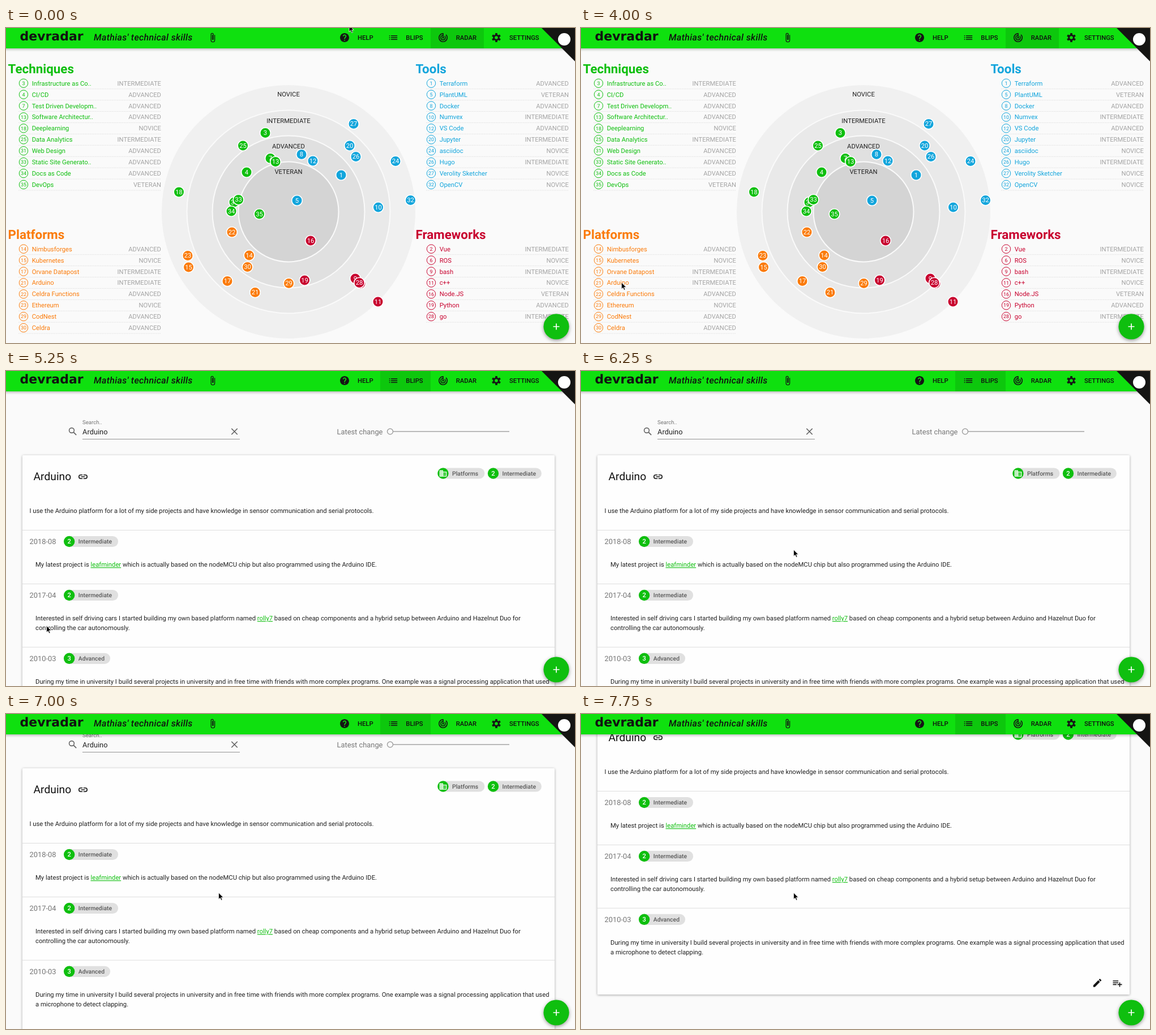
Animation, 1005 px wide and 557 px high, one loop 8 s. Source, as an HTML page:

```html
<!DOCTYPE html>
<html lang="en">
<head>
<meta charset="utf-8">
<title>devradar</title>
<style>
  html, body { margin: 0; width: 100%; height: 100%; overflow: hidden; background: #fafafa; }
  svg { display: block; width: 1005px; height: 557px; font-family: Roboto, sans-serif; }
  text { white-space: pre; text-rendering: geometricPrecision; }
  .link { fill: #0fbf0f; text-decoration: underline; }
  .bar { filter: drop-shadow(0 2px 2px #0004); }
  .card { filter: drop-shadow(0 1px 2px #0005); }
  .fab { filter: drop-shadow(0 2px 3px #0006); }
</style>
</head>
<body>
<svg id="stage" viewBox="0 0 1005 557"></svg>
<script>
const GREEN = '#0fbf0f', BLUE = '#12a5dc', ORANGE = '#fb7b0a', RED = '#c8032f';
const NOVICE = 'NOVICE', INTER = 'INTERMEDIATE', ADV = 'ADVANCED', VET = 'VETERAN';
const SMALL = 9.64, CHIP = 10.45, BODY = 11.25, LARGE = 12.86, TITLE = 16.07, HEADING = 19.3;
const LOOP = 8000, FRAME = 250, DETAIL_START = 5250;

// Each blip: number, name, level, x and y on the radar
const sections = [
  { title: 'Techniques', color: GREEN, x: 4, y: 72, blips: [
    [3, 'Infrastructure as Co..', INTER, 458, 185.5],
    [4, 'CI/CD', ADV, 425, 255],
    [7, 'Test Driven Developm..', ADV, 467, 230.5],
    [13, 'Software Architectur..', ADV, 476, 236.5],
    [18, 'Deeplearning', NOVICE, 305.5, 290],
    [25, 'Data Analytics', INTER, 418.5, 208],
    [31, 'Web Design', ADV, 403, 308],
    [33, 'Static Site Generato..', ADV, 410.5, 303.5],
    [34, 'Docs as Code', ADV, 398, 324],
    [35, 'DevOps', VET, 447.5, 329]] },
  { title: 'Tools', color: BLUE, x: 724, y: 72, blips: [
    [1, 'Terraform', ADV, 592, 260],
    [5, 'PlantUML', VET, 514, 305],
    [8, 'Docker', ADV, 522, 223.5],
    [10, 'Numvex', INTER, 657.5, 317],
    [12, 'VS Code', ADV, 542, 235],
    [20, 'Jupyter', INTER, 607, 208],
    [24, 'asciidoc', NOVICE, 688, 235.5],
    [26, 'Hugo', INTER, 618, 227.5],
    [27, 'Verolity Sketcher', NOVICE, 614, 169.5],
    [32, 'OpenCV', NOVICE, 714.5, 304.5]] },
  { title: 'Platforms', color: ORANGE, x: 4, y: 365, blips: [
    [14, 'Nimbusforges', ADV, 429.5, 402],
    [15, 'Kubernetes', NOVICE, 322.5, 423],
    [17, 'Orvane Datapost', INTER, 391, 447.5],
    [21, 'Arduino', INTER, 440, 467.5],
    [22, 'Celdra Functions', ADV, 399, 361],
    [23, 'Ethereum', NOVICE, 321, 402.5],
    [29, 'CodNest', ADV, 499.5, 451.5],
    [30, 'Celdra', ADV, 426.5, 422.5]] },
  { title: 'Frameworks', color: RED, x: 724, y: 365, blips: [
    [2, 'Vue', INTER, 626, 452],
    [6, 'ROS', NOVICE],
    [9, 'bash', NOVICE, 617, 443],
    [11, 'c++', NOVICE, 657, 484],
    [16, 'Node.JS', VET, 538, 376],
    [19, 'Python', ADV, 527.5, 446],
    [28, 'go', INTER, 624, 450.5]] },
];
sections[3].blips[2][2] = INTER;

// Text is placed by the middle of its capitals
const text = (x, y, str, size = BODY, fill = '#212121', extra = '') =>
  `<text x="${x}" y="${y + size * .355}" font-size="${size}" fill="${fill}" ${extra}>${str}</text>`;
const centered = 'text-anchor="middle"', rightAligned = 'text-anchor="end"', medium = 'font-weight="500"';
const circle = (x, y, r, fill, extra = '') => `<circle cx="${x}" cy="${y}" r="${r}" fill="${fill}" ${extra}/>`;
const line = (x1, x2, y, color, extra = '') =>
  `<path d="M${x1} ${y}H${x2}" stroke="${color}" ${extra}/>`;
const icon = (x, y, content, size = 19.2, fill = '#151515') =>
  `<g transform="translate(${x - size / 2} ${y - size / 2}) scale(${size / 24})" fill="${fill}" stroke="none">${content}</g>`;
const filled = d => `<path fill-rule="evenodd" d="${d}"/>`;
const stroked = (d, width = 2, color = '#151515') =>
  `<path d="${d}" fill="none" stroke="${color}" stroke-width="${width}"/>`;

const icons = {
  help: filled('M12 2C6.48 2 2 6.48 2 12s4.48 10 10 10 10-4.48 10-10S17.52 2 12 2zm1 17h-2v-2h2v2zm2.07-7.75l-.9.92C13.45 12.9 13 13.5 13 15h-2v-.5c0-1.1.45-2.1 1.17-2.83l1.24-1.26c.37-.36.59-.86.59-1.41 0-1.1-.9-2-2-2s-2 .9-2 2H8c0-2.21 1.79-4 4-4s4 1.79 4 4c0 .88-.36 1.68-.93 2.25z'),
  list: stroked('M3 8h2m2 0h14M3 12h2m2 0h14M3 16h2m2 0h14'),
  radar: stroked('M12 3A9 9 0 1 0 18.4 5.6M12 7A5 5 0 1 0 15.5 8.5M12 2V12') + circle(12, 12, 2, '#151515'),
  gear: circle(12, 12, 5.3, 'none', 'stroke="#151515" stroke-width="3.6"') +
    [0, 60, 120].map(turn => `<path d="M12 2V6M12 18V22" stroke="#151515" stroke-width="4.6" transform="rotate(${turn} 12 12)"/>`).join(''),
  clip: stroked('M16.5 6v11.5a4 4 0 0 1-8 0V5a2.5 2.5 0 0 1 5 0v10.5a1 1 0 0 1-2 0V6', 1.6),
  search: circle(9.5, 9.5, 5.5, 'none', 'stroke="#666" stroke-width="2"') + stroked('M13.7 13.7l6 6', 2.2, '#666'),
  close: stroked('M5.5 5.5l13 13m0-13l-13 13', 2, '#606060'),
  link: stroked('M11 8H7a4 4 0 0 0 0 8h4M13 8h4a4 4 0 0 1 0 8h-4M8 12h8'),
  building: filled('M12 7V3H2v18h20V7H12zM6 19H4v-2h2v2zm0-4H4v-2h2v2zm0-4H4V9h2v2zm0-4H4V5h2v2zm4 12H8v-2h2v2zm0-4H8v-2h2v2zm0-4H8V9h2v2zm0-4H8V5h2v2zm10 12h-8v-2h2v-2h-2v-2h2v-2h-2V9h8v10zm-2-8h-2v2h2v-2zm0 4h-2v2h2v-2z'),
  pencil: filled('M3 17.25V21h3.75L17.81 9.94l-3.75-3.75L3 17.25zM20.71 7.04c.39-.39.39-1.02 0-1.41l-2.34-2.34c-.39-.39-1.02-.39-1.41 0l-1.83 1.83 3.75 3.75 1.83-1.83z'),
  addRow: stroked('M2 7h12M2 11h12M2 15h8M12 15h10M17 10v10'),
};

function sectionList({ title, color, x, y, blips }) {
  const rows = blips.map(([number, name, level], i) => {
    const rowY = y + 25.7 + i * 19.92;
    return circle(x + 27, rowY, 7.7, 'none', `stroke="${color}"`) +
      text(x + 27, rowY, number, 9, color, centered) +
      text(x + 41.7, rowY, name, BODY, color) +
      text(x + 270, rowY, level, BODY, '#a4a4a4', rightAligned) +
      line(x + 18, x + 270, rowY + 10, '#e4e4e4', 'stroke-dasharray="2 1"');
  });
  return text(x - .5, y, title, 22.4, color, 'font-weight="700"') + rows.join('');
}

function radarView() {
  const rings = [[225, '#f0f0f0', NOVICE, 117.5], [179.5, '#e9e9e9', INTER, 164],
                 [134.5, '#e0e0e0', ADV, 209], [88.5, '#d4d4d4', VET, 254]];
  const discs = rings.map(([r, fill]) => circle(499, 325, r, fill, 'stroke="#fafafa" stroke-width="2"'));
  const labels = rings.map(([, , name, y]) => text(499, y, name, BODY, '#222', centered));
  const blips = sections
    .flatMap(s => s.blips.map(([number, , , x, y]) => ({ number, x, y, color: s.color })))
    .filter(b => b.x)
    .sort((a, b) => a.number - b.number)
    .map(b => circle(b.x, b.y, 9.3, b.color, 'stroke="#fff" stroke-width="1.6"') +
      text(b.x, b.y, b.number, BODY, '#fff', centered));
  return [...discs, ...labels, ...blips, ...sections.map(sectionList)].join('');
}

function chip(x, y, width, badge, label) {
  const mark = badge === 'building' ? icon(x, y, icons.building, 15, '#fff')
    : text(x, y, badge, BODY, '#fff', `${centered} ${medium}`);
  return `<rect x="${x - 9.6}" y="${y - 9.6}" width="${width}" height="19.2" rx="9.6" fill="#e0e0e0"/>` +
    circle(x, y, 9.7, GREEN) + mark + text(x + 16, y, label, CHIP, '#5a5a5a', medium);
}

function historyEntry(y, date, badge, level, width, lines) {
  return line(29, 969, y - 20, '#dedede') + text(41.5, y, date, LARGE, '#757575') +
    chip(111.7, y, width, badge, level) +
    lines.map((str, i) => text(52, y + 40.7 + i * 17, str)).join('');
}

const link = str => `<tspan class="link">${str}</tspan>`;

function detailView() {
  return icon(118, 107, icons.search) + text(135, 90.5, 'Search..', SMALL, '#757575') +
    text(135, 107, 'Arduino', LARGE) + line(135, 413, 120.5, '#949494') + icon(403.5, 107, icons.close) +
    text(584.5, 107, 'Latest change', LARGE, '#757575') + line(684, 889, 107, '#a3a3a3', 'stroke-width="1.6"') +
    circle(678.5, 107, 5, 'none', 'stroke="#a3a3a3" stroke-width="1.5"') +
    '<rect class="card" x="29" y="149" width="940" height="492" rx="1.5" fill="#fefefe"/>' +
    text(48.5, 186, 'Arduino', HEADING, '#111') + icon(136, 187, icons.link) +
    chip(772, 181, 83, 'building', 'Platforms') + chip(860.5, 181, 95, 2, 'Intermediate') +
    text(41.5, 247.5, 'I use the Arduino platform for a lot of my side projects and have knowledge in sensor communication and serial protocols.') +
    historyEntry(301.5, '2018-08', 2, 'Intermediate', 96, [
      `My latest project is ${link('leafminder')} which is actually based on the nodeMCU chip but also programmed using the Arduino IDE.`]) +
    historyEntry(396.5, '2017-04', 2, 'Intermediate', 96, [
      `Interested in self driving cars I started building my own based platform named ${link('rolly7')} based on cheap components and a hybrid setup between Arduino and Hazelnut Duo for`,
      'controlling the car autonomously.']) +
    historyEntry(508.3, '2010-03', 3, 'Advanced', 82, [
      'During my time in university I build several projects in university and in free time with friends with more complex programs. One example was a signal processing application that used',
      'a microphone to detect clapping.']) +
    icon(912, 620.5, icons.pencil) + icon(947.5, 621, icons.addRow);
}

function header() {
  const nav = [[598, 621, 'help', 'HELP'], [684, 706.3, 'list', 'BLIPS'],
               [772, 794.7, 'radar', 'RADAR'], [866, 889, 'gear', 'SETTINGS']];
  return '<rect class="bar" x="-8" y="-8" width="1021" height="44" fill="#0fe00f"/>' +
    '<rect id="tab" height="36" fill="#0dc70d"/>' +
    text(24.5, 14, 'devradar', 22, '#111', 'font-weight="700" font-family="DejaVu Sans, sans-serif"') +
    text(155, 16.5, "Mathias' technical skills", TITLE, '#111', `${medium} font-style="italic" letter-spacing=".32"`) +
    icon(365, 17, icons.clip) +
    nav.map(([x, labelX, name, label]) => icon(x, 17, icons[name]) + text(labelX, 17, label, BODY, '#111', medium)).join('') +
    '<path d="M946 0H1005V59z" fill="#151513"/>' + circle(986, 20, 11, '#fff');
}

const stage = document.getElementById('stage');
stage.innerHTML =
  `<rect width="1005" height="557" fill="#fafafa"/>
   <g id="radar">${radarView()}</g><g id="detail">${detailView()}</g>${header()}
   <g class="fab">${circle(972, 528, 22.6, GREEN)}</g>${stroked('M966.5 528h11m-5.5-5.5v11', 1.7, '#fff')}
   <rect id="status" x="-1" width="161" height="20" rx="2" fill="#e9e9e9" stroke="#cfcfcf"/>
   <path id="cursor" d="M0 0V11.8L2.7 9.2 4.7 13.4 6.6 12.5 4.7 8.4H8.4z" fill="#000" stroke="#fff" stroke-width=".8"/>`;
const [radar, detail, tab, statusBar, cursor] =
  ['radar', 'detail', 'tab', 'status', 'cursor'].map(id => document.getElementById(id));

// Keys are held until the next one: [time, ...values]
const cursorKeys = [[0, 606, -5], [250, 713.5, 70], [2500, 708.5, 71], [2750, 570, 119], [3000, 229, 318],
  [3250, 134.5, 384], [3500, 97.5, 411], [3750, 84.5, 437], [4000, 71.5, 450], [4250, 71.5, 450.5],
  [5500, 72.5, 448], [5750, 173.5, 393], [6000, 194.5, 380], [6250, 375.5, 316]];
const scrollKeys = [[0, 0], [6500, 2], [6750, 19], [7000, 53], [7250, 88], [7500, 122], [7750, 145]];
const statusKeys = [[0, 560], [4250, 549.5], [4500, 551.5], [4750, 552.5], [5000, 560]];
const held = (keys, time) => keys.findLast(([start]) => start <= time).slice(1);

function draw(now) {
  const time = Math.floor(now % LOOP / FRAME) * FRAME;
  const showDetail = time >= DETAIL_START;
  radar.style.display = showDetail ? 'none' : '';
  detail.style.display = showDetail ? '' : 'none';
  tab.setAttribute('x', showDetail ? 661 : 750);
  tab.setAttribute('width', showDetail ? 89 : 94);
  detail.setAttribute('transform', `translate(0 ${-held(scrollKeys, time)[0]})`);
  statusBar.setAttribute('y', held(statusKeys, time)[0]);
  cursor.setAttribute('transform', `translate(${held(cursorKeys, time)})`);
}

const start = performance.now();
function tick() {
  draw(performance.now() - start);
  requestAnimationFrame(tick);
}
tick();
</script>
</body>
</html>
```
